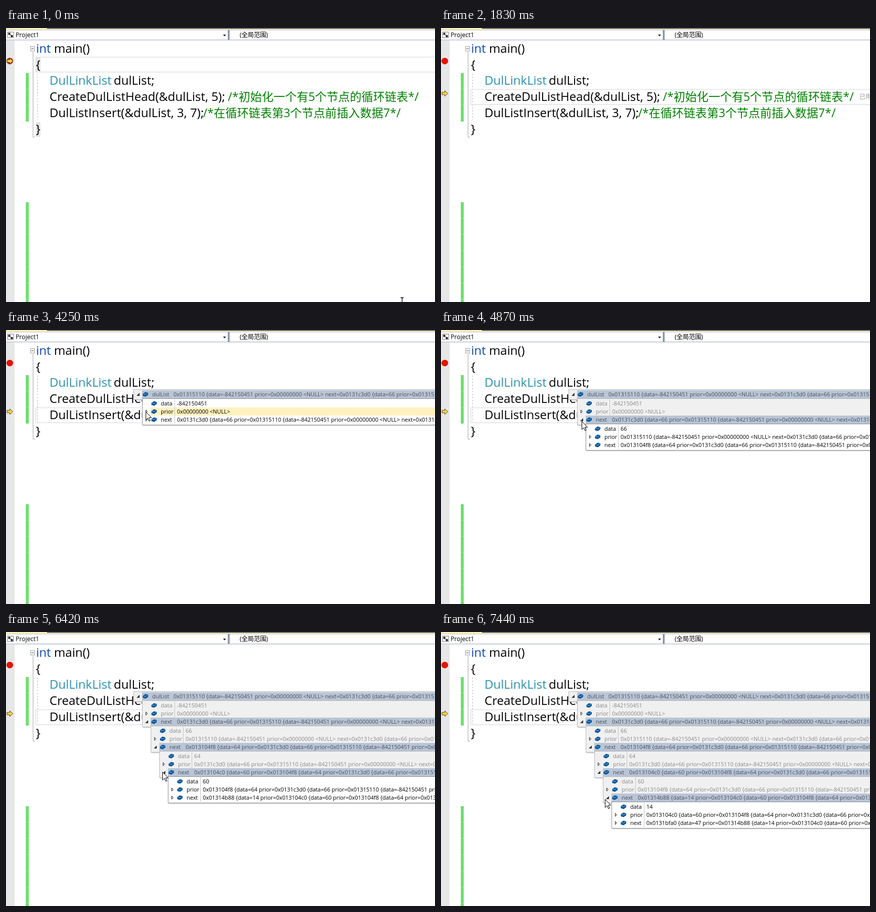
An HTML page for the animation above (8 s loop, 848 by 541 pixels).

```html
<!DOCTYPE html>
<html lang="zh-CN">
<head>
<meta charset="utf-8">
<title>Debugger walk through a linked list</title>
<style>
html, body { margin: 0; width: 100%; height: 100%; overflow: hidden; background: #fff; }
svg { display: block; width: 848px; height: 541px; }
text { font-family: "Open Sans", "Noto Sans CJK SC", "Noto Sans CJK", sans-serif; white-space: pre; }
.code { font-size: 24px; }
.note { font-size: 23px; fill: #008000; }
.ui { font-size: 12.2px; }
.lap { font-size: 12px; fill: #999; }
.tip text { font-size: 10.95px; fill: #000; }
.tip .back { fill: #fff; stroke: #8c8f96; }
.tip.off .back { fill: #f0f0f0; stroke: #b4b7bd; }
.tip.off text { fill: #8a8a8a; }
.tip.off .open text { fill: #4b5058; }
.tip .bar { fill: none; }
.tip .hover .bar { fill: #fff2c0; }
.tip.off .open .bar { fill: #b9c5d6; }
.tip .down, .tip.off .open .right { display: none; }
.tip.off .open .down { display: inline; }
</style>
</head>
<body>
<svg id="stage" viewBox="0 0 848 541" xmlns="http://www.w3.org/2000/svg"></svg>
<script>
const LOOP = 8000;
const stage = document.getElementById('stage');

// Linked list: address, data; neighbours follow array order
const nodes = [
  ['0x01315110', -842150451], ['0x0131c3d0', 66], ['0x013104f8', 64],
  ['0x013104c0', 60], ['0x01314b88', 14], ['0x0131bfa0', 47]
];
const openAt = [3300, 3850, 4790, 5650, 6420, 7210];
// Pointer keys: time, x, y
const path = [
  [0, 783, 541], [50, 783, 541], [590, 610, -22], [2450, 420, -20],
  [3150, 247, 103.5], [3400, 247, 103.5], [3700, 263, 126], [4100, 263, 126],
  [4250, 276, 161], [4630, 278, 180], [5110, 278, 180], [5410, 294, 224],
  [5720, 294, 224], [6190, 309, 276], [6590, 309, 276], [6970, 324, 330],
  [LOOP, 324, 330]
];

const esc = s => String(s).replace(/&/g, '&amp;').replace(/</g, '&lt;');
const text = (x, y, s, cls, fill = '#000') =>
  `<text x="${x}" y="${y}" class="${cls}" fill="${fill}">${esc(s)}</text>`;
const rect = (x, y, w, h, fill, more = '') =>
  `<rect x="${x}" y="${y}" width="${w}" height="${h}" fill="${fill}" ${more}/>`;
const shape = (d, fill, more = '') => `<path d="${d}" fill="${fill}" ${more}/>`;

function describe(i, depth) {
  if (!nodes[i]) return '0x00000000 <NULL>';
  const [addr, data] = nodes[i];
  if (!depth) return addr + ' {...}';
  return `${addr} {data=${data} prior=${describe(i - 1, depth - 1)} next=${describe(i + 1, depth - 1)}}`;
}

const tipLeft = k => 252 + 17 * k;
const tipTop = k => k ? 85 + 50 * k : 117;
const tipRows = k => k
  ? [['data', nodes[k - 1][1]], ['prior', describe(k - 2, 4)], ['next', describe(k, 4)]]
  : [['dulList', describe(0, 4)]];

function tipRow(k, i, [name, value], last) {
  const x = tipLeft(k), y = tipTop(k) + 2 + 16 * i, sep = x + (k ? 64.5 : 75.5);
  const expander = name === 'data' ? '' :
    shape(`M${x + 7.5} ${y + 5}l3.2 3l-3.2 3z`, '#fff', 'class="right" stroke="#222"') +
    shape(`M${x + 12} ${y + 5}v6h-6z`, '#333', 'class="down"');
  return `<g class="row ${last ? 'open' : ''}">` +
    rect(x + 17, y, 900, 16, 'none', 'class="bar"') + expander +
    shape(`M${x + 18.5} ${y + 7}l5-3.5l5.5 1.5v4l-5 3.5l-5.5-1.5z`, '#00539c') +
    shape(`M${x + 20} ${y + 7.3}l4 1l3.6-2.4`, 'none', 'stroke="#c5dcf0" stroke-width=".8"') +
    text(x + 37, y + 12, name, '') + rect(sep - .5, y, 1, 16, '#c4c6ca') +
    text(sep + (k ? 4.5 : 3.5), y + 12, value, '') + '</g>';
}

function tip(k) {
  const rows = tipRows(k), x = tipLeft(k), y = tipTop(k), h = 16 * rows.length + 5;
  return '<g class="tip">' + rect(x + 2, y + h, 900, 1.5, '#000', 'opacity=".16"') +
    rect(x + .5, y + .5, 900, h - 1, '#fff', 'class="back"') +
    rows.map((r, i) => tipRow(k, i, r, i === rows.length - 1)).join('') + '</g>';
}

const header =
  rect(0, 0, 848, 4, '#fff0b8') + rect(81, 0, 767, 1.4, '#33435f') +
  rect(0, 3.5, 848, 1, '#b9c3d3') + rect(0, 23, 848, 1.2, '#aab3c3') +
  rect(438.5, 4, 3.5, 19.5, '#8793a9') +
  rect(3, 8, 12, 11, '#fff', 'stroke="#777"') +
  rect(4.5, 9.5, 4, 4, '#222') + rect(9.5, 14, 4, 4, '#222') +
  shape('M8 13l3 3', 'none', 'stroke="#222"') +
  text(19, 18, 'Project1', 'ui') + shape('M429 13h6l-3 3.5z', '#222') +
  text(462, 18, '(全局范围)', 'ui');

// Change marks with a faint seam under every code line
const changed = (y1, y2) => rect(39.3, y1, 5.5, y2 - y1, '#8fe58f') +
  shape(`M42.05 ${y1}V${y2}`, 'none', 'stroke="#6cde6c" stroke-width="5.5" stroke-dasharray="31 1"');

const gutter =
  rect(0, 24, 17, 517, '#e6e7e8') + changed(89, 185) + changed(344, 541) +
  shape('M53.5 47V215.5H57', 'none', 'stroke="#a5a5a5"') +
  rect(48.5, 36.5, 8, 9, '#fff', 'stroke="#a0a0a0"') + rect(50, 40.5, 5, 1, '#444') +
  shape('M62.5 90V181', 'none', 'stroke="#b8b8b8" stroke-dasharray="3 3"');

const code =
  text(59.5, 49, 'int', 'code', '#0a49b4') + text(95, 49, 'main()', 'code') +
  text(59, 80.5, '{', 'code') +
  text(86, 112, 'DulLinkList', 'code', '#2b91af') + text(213, 112, 'dulList;', 'code') +
  text(86, 144, 'CreateDulListHead(&dulList, 5);', 'code') +
  text(438.5, 144, '/*初始化一个有5个节点的循环链表*/', 'note') +
  text(86, 176, 'DulListInsert(&dulList, 3, 7);', 'code') +
  text(389.5, 176, '/*在循环链表第3个节点前插入数据7*/', 'note') +
  text(59, 208, '}', 'code');

stage.innerHTML = rect(0, 0, 848, 541, '#fff') + header + gutter +
  `<g id="line">${rect(59, 1.5, 800, 29.5, 'none', 'stroke="#e5e6ec" stroke-width="1.8"')}</g>` +
  `<g id="braces">${rect(59, 58, 9, 28, '#e3e3e3') + rect(59, 186, 9, 29, '#e3e3e3')}</g>` +
  code +
  `<g id="lap">${text(0, 0, '已用时间 <= 1ms', 'lap')}</g>` +
  '<circle id="stop" cx="7.5" cy="65.2" r="6.5"/>' +
  `<g id="step">${shape('M2 -2.5h5.5v-3l6 5.5l-6 5.5v-3h-5.5z', '#ffd240', 'stroke="#5c4a1c" stroke-linejoin="round"')}</g>` +
  rect(59, 0, 1.3, 30, '#222', 'id="caret"') +
  `<g id="run">${shape('M66 97l7 6.5l-7 6.5z', '#7cc487') + rect(74, 97, 1.6, 13, '#3a9a4a')}</g>` +
  openAt.map((_, k) => tip(k)).join('') +
  `<g id="beam">${shape('M-3 -8.5h2.3l.7 .7l.7 -.7h2.3M0 -8V8M-3 8.5h2.3l.7 -.7l.7 .7h2.3', 'none', 'stroke="#000" stroke-width="1.3"')}</g>` +
  `<g id="arrow">${shape('M.5 .5v16l3.7 -3.6l2.6 6l2.4 -1l-2.6 -5.9h5z', '#fff', 'stroke="#000"')}</g>`;

const $ = id => document.getElementById(id);
const tips = [...stage.querySelectorAll('.tip')].map(el => ({ el, rows: [...el.querySelectorAll('.row')] }));
const show = (el, on) => el.setAttribute('display', on ? 'inline' : 'none');
const move = (el, x, y) => el.setAttribute('transform', `translate(${x} ${y})`);
const clamp = v => Math.max(0, Math.min(1, v));

function pointer(t) {
  const i = path.findIndex((p, n) => n && t < p[0]);
  const [a, b] = [path[i - 1], path[i]];
  const u = (t - a[0]) / (b[0] - a[0]), e = u * (2 - u);
  return [a[1] + (b[1] - a[1]) * e, a[2] + (b[2] - a[2]) * e];
}

function draw(t) {
  const line = t < 1280 ? 1 : t < 2140 ? 3 : 4;
  const top = 24 + 32 * line;
  const [x, y] = pointer(t);

  move($('line'), 0, top);
  show($('braces'), line === 1);
  $('stop').setAttribute('fill', line === 1 ? '#a8301c' : '#e51400');
  move($('step'), 0, line === 1 ? 65.2 : top + 9.2);

  const since = t - [460, 1280, 2140][line < 3 ? 0 : line - 2];
  show($('caret'), t < 3730 && Math.floor(since / 530) % 2 === 0);
  $('caret').setAttribute('y', top + 1);

  move($('lap'), line === 3 ? 827 : 792, top + 20);
  const shown = line === 3 ? 1640 : 2490;
  $('lap').setAttribute('opacity', line === 1 ? 0 : clamp((t - shown) / 170));

  const onTip = t >= 3550, isArrow = onTip || y < 26;
  show($('run'), !onTip && t > 2140 && y > 88 && y < 120);
  show($('beam'), !isArrow);
  show($('arrow'), isArrow);
  move($('beam'), x, y);
  move($('arrow'), Math.round(x), Math.round(y));

  const deepest = openAt.filter(o => t >= o).length - 1;
  tips.forEach(({ el, rows }, k) => {
    show(el, k <= deepest);
    el.classList.toggle('off', k < deepest);
    const hit = k === deepest && onTip && x >= tipLeft(k) ? Math.floor((y - tipTop(k) - 2) / 16) : -1;
    rows.forEach((r, i) => r.classList.toggle('hover', i === hit));
  });
}

function tick() {
  draw(performance.now() % LOOP);
  requestAnimationFrame(tick);
}
tick();
</script>
</body>
</html>
```
